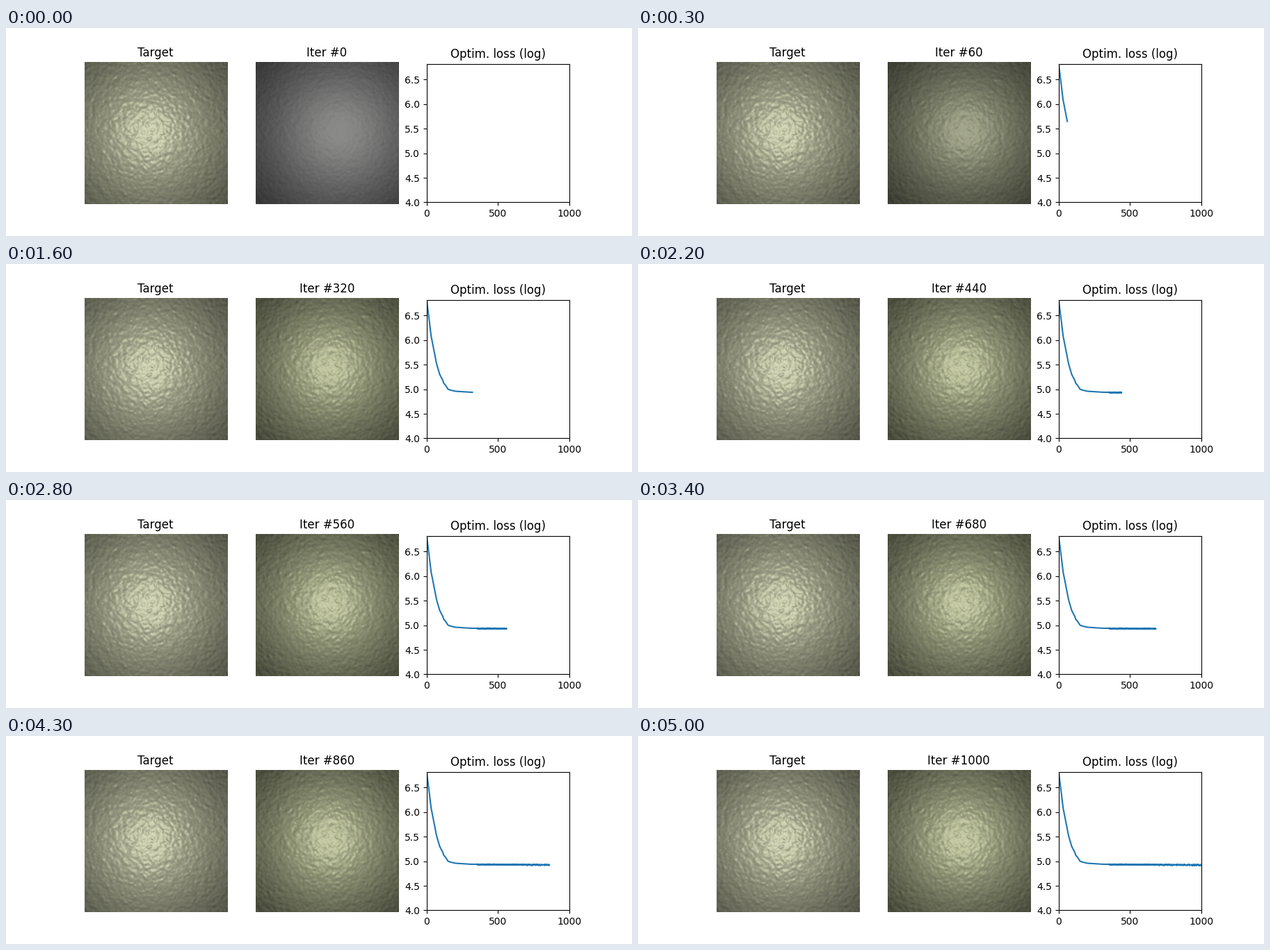
A matplotlib script for the animation above (5100 ms loop, 900x300 px).

```python
import numpy as np
import matplotlib.pyplot as plt
from matplotlib.animation import FuncAnimation

plt.rcParams["font.family"] = "DejaVu Sans"

SIZE = 206
FRAMES = 51
STEP = 20
Y, X = np.mgrid[:SIZE, :SIZE].astype(float)


def bump_slopes(seed, sigma):
    """Slopes of a smooth random height field, scaled to unit spread."""
    noise = np.random.default_rng(seed).normal(size=(SIZE, SIZE))
    fy = np.fft.fftfreq(SIZE)[:, None]
    fx = np.fft.fftfreq(SIZE)[None, :]
    blur = np.exp(-2 * (np.pi * sigma) ** 2 * (fx**2 + fy**2))
    height = np.fft.ifft2(np.fft.fft2(noise) * blur).real
    gy, gx = np.gradient(height)
    return gx / gx.std(), gy / gy.std()


def shade(slopes, bump, center, dist, albedo, spec, power):
    """Light a bumpy plane with a lamp placed at the camera."""
    gx, gy = bump * slopes[0], bump * slopes[1]
    vx = (center[0] - X) / 103
    vy = (center[1] - Y) / 103
    r = np.sqrt(vx**2 + vy**2 + dist**2)
    cos = (dist - gx * vx - gy * vy) / (r * np.sqrt(1 + gx**2 + gy**2))
    cos = np.clip(cos, 0, 1)[..., None]
    fall = (dist / r)[..., None] ** 2
    return np.clip(fall * (albedo * cos + spec * cos**power), 0, 1)


GRAY = np.full(3, 0.73)
OLIVE = np.array([0.62, 0.64, 0.51])
SHINE = np.array([0.17, 0.17, 0.15])

target = shade(bump_slopes(4, 1.6), 0.08, (93, 102), 1.95,
               np.array([0.64, 0.65, 0.55]),
               np.array([0.20, 0.20, 0.17]), 55)
guess_slopes = bump_slopes(11, 1.6)


def guess(it):
    hue = 1 - np.exp(-it / 30)
    fit = 1 - np.exp(-it / 60)
    level = 1 - 0.3 * np.exp(-it / 100)
    albedo = level * (GRAY + (OLIVE - GRAY) * hue)
    return shade(guess_slopes, 0.04 + 0.035 * fit, (120 - 14 * fit, 101), 1.7,
                 albedo, SHINE * (0.2 + 0.8 * fit), 25 + 20 * fit)


# Loss curve: a few knots plus a small late jitter
iters = np.arange(1001)
loss = np.interp(
    iters,
    [0, 10, 30, 50, 60, 70, 90, 100, 110, 120, 130, 150, 170, 200, 300, 400, 1000],
    [6.82, 6.58, 6.10, 5.80, 5.65, 5.51, 5.31, 5.25, 5.20, 5.12, 5.09,
     5.00, 4.98, 4.96, 4.94, 4.933, 4.923])
jitter = np.random.default_rng(2).normal(0, 0.005, iters.size)
loss += np.where(iters > 350, jitter, 0)

fig, (ax_target, ax_guess, ax_loss) = plt.subplots(1, 3, figsize=(9, 3), dpi=100)

ax_target.imshow(target, interpolation="nearest")
ax_target.set_title("Target", x=0.4976)
ax_target.axis("off")

view = ax_guess.imshow(guess(0), interpolation="nearest")
title = ax_guess.set_title("Iter #0")
ax_guess.axis("off")

line, = ax_loss.plot([], [], color="#1f77b4", lw=1.5)
ax_loss.set_xlim(0, 1000)
ax_loss.set_ylim(4, 6.824)
ax_loss.set_xticks([0, 500, 1000])
ax_loss.set_yticks(np.arange(4, 6.6, 0.5))
ax_loss.set_box_aspect(0.9744)
ax_loss.set_title("Optim. loss (log)")


def draw(frame):
    it = frame * STEP
    view.set_data(guess(it))
    title.set_text(f"Iter #{it}")
    shown = iters <= it
    line.set_data(iters[shown], loss[shown])
    return view, title, line


anim = FuncAnimation(fig, draw, frames=FRAMES, interval=100, repeat=True,
                     repeat_delay=0, blit=False)
plt.show()
```
